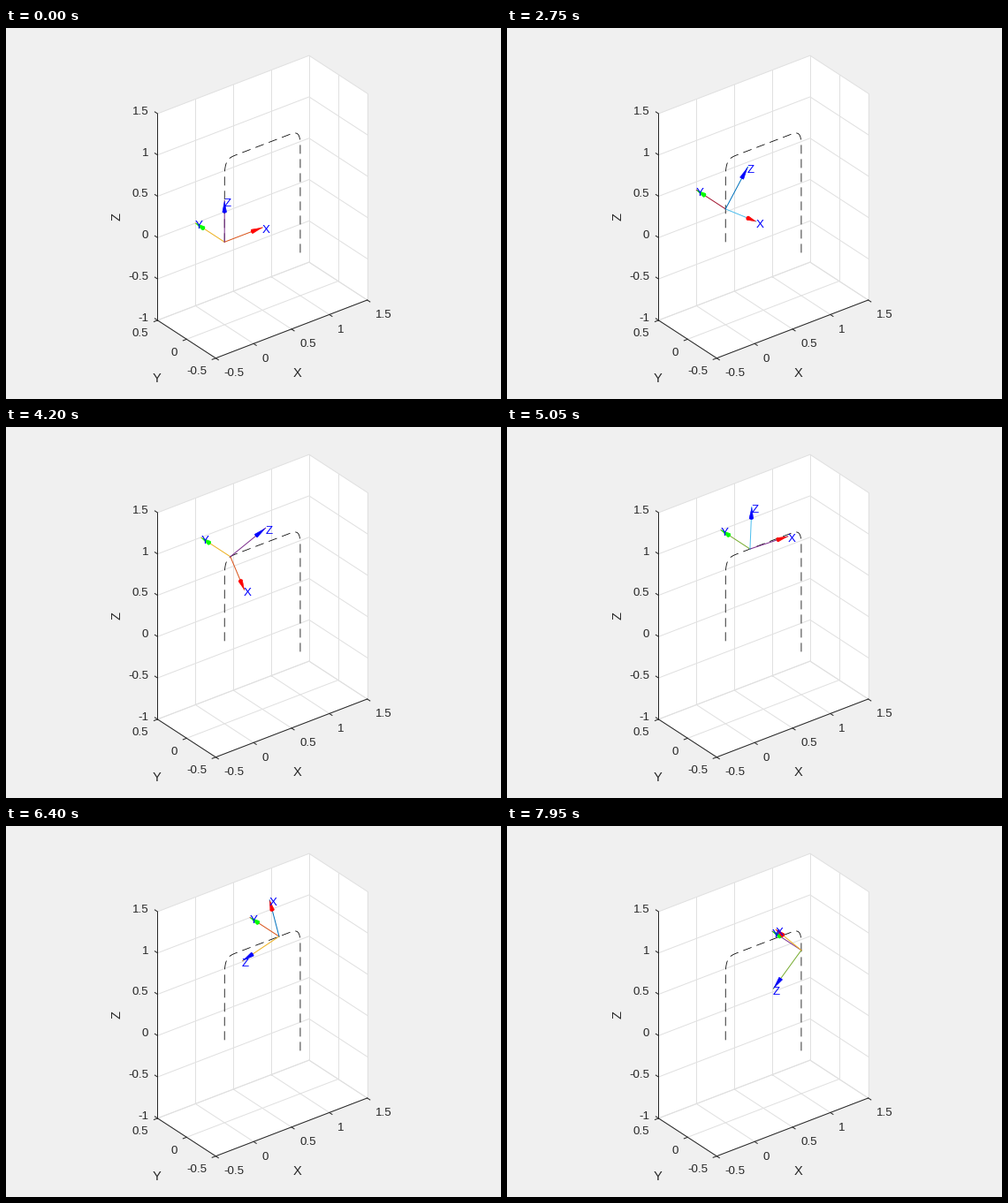
A matplotlib script that plays this animation: 560 px wide and 420 px high, repeating every 8000 ms.

```python
import numpy as np
import matplotlib
import matplotlib.pyplot as plt
from matplotlib.animation import FuncAnimation
from matplotlib.collections import PolyCollection

matplotlib.rcParams["font.family"] = "Liberation Sans"

W, H, DPI = 560, 420, 100
PX = 72 / DPI                       # points per pixel
FRAMES, STEP = 160, 50

INK = (0.15, 0.15, 0.15)
GRID = (0.88, 0.88, 0.88)
ORDER = [(0, .447, .741), (.85, .325, .098), (.929, .694, .125),
         (.494, .184, .556), (.466, .674, .188), (.301, .745, .933),
         (.635, .078, .184)]

# Orthographic view: azimuth -37.5, elevation 30
SCALE = 108.05
AZ, EL = np.radians(37.5), np.radians(30)
ORIGIN = np.array([247.2, 242.3])
BASIS = SCALE * np.array([[np.cos(AZ), -np.sin(AZ) * np.sin(EL)],
                          [-np.sin(AZ), -np.cos(AZ) * np.sin(EL)],
                          [0, -np.cos(EL)]])
EYE = np.array([-np.sin(AZ) * np.cos(EL), -np.cos(AZ) * np.cos(EL), np.sin(EL)])

# Via points (x, z, pitch in degrees) and the frame at which each corner falls
VIA = np.array([[0, 0, 0], [0, 1, 90], [1, 1, -180], [1, -.5, 90]], float)
CORNER = np.array([39, 79, 147, 215])
HALF = 10                           # half the blend time, in frames
AXIS, HEAD, RADIUS = 0.5, 0.135, 0.023


def project(p):
    return ORIGIN + np.asarray(p, float) @ BASIS


def ramp(t):
    """Integral of a smoothstep centred on zero."""
    u = np.clip((t + HALF) / (2 * HALF), 0, 1)
    return 2 * HALF * (u**3 - u**4 / 2) + max(t - HALF, 0)


def pose(t):
    """Piecewise linear motion through the via points with smooth blends."""
    speed = np.diff(VIA, axis=0) / np.diff(CORNER)[:, None]
    speed = np.vstack([np.zeros(3), speed, np.zeros(3)])
    q = VIA[0].copy()
    for change, corner in zip(np.diff(speed, axis=0), CORNER):
        q += change * ramp(t - corner)
    return q


def directions(pitch):
    c, s = np.cos(np.radians(pitch)), np.sin(np.radians(pitch))
    return np.array([[c, 0, -s], [0, 1, 0], [s, 0, c]])


fig = plt.figure(figsize=(W / DPI, H / DPI), dpi=DPI, facecolor="#f0f0f0")
ax = fig.add_axes([0, 0, 1, 1])
ax.set_xlim(0, W)
ax.set_ylim(H, 0)
ax.axis("off")


def line3(points, color, z=2, width=1, **kw):
    p = project(points)
    return ax.plot(p[:, 0], p[:, 1], color=color, lw=width * PX, zorder=z, **kw)[0]


def label(x, y, s, px=13.33, color=INK, **kw):
    """Text whose capitals are centred vertically on y."""
    return ax.text(x, y + 0.36 * px, s, fontsize=px * PX, color=color,
                   va="baseline", zorder=6, **kw)


def number(v):
    return f"{v:g}"


def draw_box():
    xs = np.arange(-.5, 1.6, .5)
    ys = np.arange(-.5, .6, .5)
    zs = np.arange(-1, 1.6, .5)
    x0, x1, y0, y1, z0, z1 = xs[0], xs[-1], ys[0], ys[-1], zs[0], zs[-1]

    outline = [(x0, y0, z0), (x1, y0, z0), (x1, y0, z1),
               (x1, y1, z1), (x0, y1, z1), (x0, y1, z0)]
    ax.add_patch(plt.Polygon(project(outline), fc="white", ec="none", zorder=0))

    # Separate segments, so that each upright falls on whole pixels
    for x in xs:
        line3([(x, y0, z0), (x, y1, z0)], GRID, 1)
        line3([(x, y1, z0), (x, y1, z1)], GRID, 1)
    for y in ys:
        line3([(x0, y, z0), (x1, y, z0)], GRID, 1)
        line3([(x1, y, z0), (x1, y, z1)], GRID, 1)
    for z in zs:
        line3([(x0, y1, z), (x1, y1, z), (x1, y0, z)], GRID, 1)
    line3([(x0, y1, z1), (x0, y1, z0)], INK)
    line3([(x0, y1, z0), (x0, y0, z0), (x1, y0, z0)], INK)

    tick = 0.047
    for x in xs:
        line3([(x, y0, z0), (x, y0 - tick, z0)], INK)
        px, py = project((x, y0, z0))
        label(px + 9.3, py + 15.5, number(x))
    for y in ys:
        line3([(x0, y, z0), (x0 - tick, y, z0)], INK)
        px, py = project((x0, y, z0))
        label(px - 10.2, py + 13.5, number(y), ha="right")
    for z in zs:
        line3([(x0, y1, z), (x0, y1 + tick, z)], INK)
        px, py = project((x0, y1, z))
        label(px - 10.2, py - 4, number(z), ha="right")

    label(330, 390, "X", 14.67, ha="center")
    label(171, 395.8, "Y", 14.67, ha="center")
    ax.text(125.5, 213.5, "Z", fontsize=14.67 * PX, color=INK, rotation=90,
            ha="center", va="center")


def draw_path():
    times = np.arange(CORNER[0] - HALF, CORNER[-1] + HALF + 1)
    q = np.array([pose(t) for t in times])
    width = 0.8
    line3(np.column_stack([q[:, 0], 0 * q[:, 0], q[:, 1]]), "black", 3, width,
          dashes=(10 / width, 6 / width), dash_capstyle="butt", snap=False)


class Arrow:
    """One axis of the moving frame: shaft, cone and letter."""

    def __init__(self, letter, color):
        self.shaft = line3([(0, 0, 0), (0, 0, 0)], INK, 4, snap=False)
        self.cone = PolyCollection([], facecolor=color, edgecolor="none",
                                   snap=False)
        ax.add_collection(self.cone, autolim=False)
        self.text = label(0, 0, letter, color="blue")

    def place(self, origin, d, side, up, color):
        tip = origin + AXIS * d
        p = project([origin, tip])
        self.shaft.set_data(p[:, 0], p[:, 1])
        self.shaft.set_color(color)

        a = np.linspace(0, 2 * np.pi, 17)[:, None]
        ring = project(tip - HEAD * d
                       + RADIUS * (np.cos(a) * side + np.sin(a) * up))
        faces = [np.array([p[1], r0, r1]) for r0, r1 in zip(ring, ring[1:])]
        self.cone.set_verts([ring] + faces)

        depth = AXIS * d @ EYE
        self.shaft.set_zorder(4 + depth)
        self.cone.set_zorder(4.05 + depth)
        self.text.set_position((p[1, 0] - 0.5, p[1, 1] + 6.5))


draw_box()
draw_path()
arrows = [Arrow("X", "#ff0000"), Arrow("Y", "#00ff00"), Arrow("Z", "#0000ff")]


def update(n):
    x, z, pitch = pose(n)
    origin = np.array([x, 0, z])
    d = directions(pitch)
    for i, arrow in enumerate(arrows):
        color = ORDER[(3 * n + 1 + i) % len(ORDER)]
        arrow.place(origin, d[i], d[(i + 1) % 3], d[(i + 2) % 3], color)
    return []


anim = FuncAnimation(fig, update, frames=FRAMES, interval=STEP,
                     repeat=True, repeat_delay=0, blit=False)
plt.show()
```
